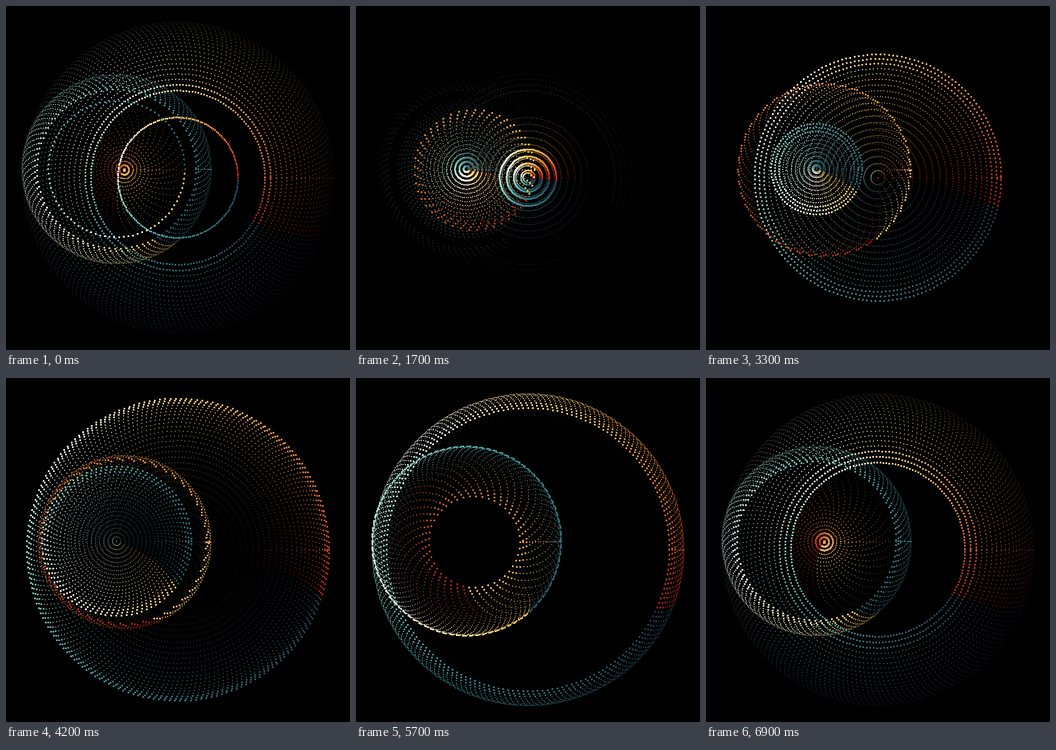
Write an HTML page with a canvas that moves like this. It is 600x600 px and loops after 7 s.

```html
<!DOCTYPE html>
<html>
<head>
<meta charset="utf-8">
<style>
  html, body { margin: 0; height: 100%; background: #000; overflow: hidden; }
  canvas { display: block; }
</style>
</head>
<body>
<canvas id="stage" width="600" height="600"></canvas>
<script>
const ctx = document.getElementById('stage').getContext('2d');
const STEP_MS = 100, STEPS = 70;
const SWELL = 69;        // steps from zero radius back to zero
const CYCLE = 73.3;      // phase carried over when the loop restarts
const TURN = 16;         // dot spacings rotated per loop
const TRAIL = 25;

// 1 x 256 colour ramp shared by all rings
const ramp = ctx.createLinearGradient(0, 0, 256, 0);
['#233d55', '#2f6670', '#3f9096', '#8ed2c4', '#ffffff', '#ffd272', '#e88430', '#b21a10']
  .forEach((color, i, all) => ramp.addColorStop(i / (all.length - 1), color));
ctx.fillStyle = ramp;
ctx.fillRect(0, 0, 256, 1);
const pixels = ctx.getImageData(0, 0, 256, 1).data;

function rampColor(p) {
  const i = Math.round(p * 255) * 4;
  return `rgb(${pixels[i]},${pixels[i + 1]},${pixels[i + 2]})`;
}

// start: step at which the ring begins to grow; from, to: its part of the ramp
const rings = [
  { x: 300, y: 299.5, max: 272, count: 180, start: 13, from: 0, to: 1 },
  { x: 206.5, y: 286, max: 151, count: 45, start: 0.2, from: 1, to: 0.72 },
  { x: 193, y: 284.5, max: 165, count: 90, start: 22, from: 0.74, to: 0.1 }
];
for (const ring of rings)
  ring.colors = Array.from({ length: ring.count }, (_, i) =>
    rampColor(ring.from + (ring.to - ring.from) * i / (ring.count - 1)));

function radiusAt(ring, step) {
  const local = step - ring.start + (step < ring.start ? CYCLE : 0);
  return ring.max * Math.max(0, Math.sin(Math.PI * local / SWELL));
}

function dot(x, y, size, color) {
  ctx.fillStyle = color;
  ctx.fillRect(Math.round(x - size / 2), Math.round(y - size / 2), size, size);
}

function drawRing(ring, step, size) {
  const { x, y, count, colors } = ring;
  const r = radiusAt(ring, step);
  const shift = TURN * step / STEPS;
  for (let i = 0; i < count; i++) {
    const a = (i + shift) / count * 2 * Math.PI;
    dot(x + r * Math.cos(a), y + r * Math.sin(a), size, colors[i]);
  }
  // one dot stays on the horizontal axis
  dot(x + r, y, size, colors[Math.floor(count - 1 - shift)]);
}

function draw(step) {
  ctx.globalAlpha = 1;
  ctx.fillStyle = '#000';
  ctx.fillRect(0, 0, 600, 600);
  for (let age = TRAIL - 1; age >= 0; age--) {
    ctx.globalAlpha = (1 - age / TRAIL) ** 1.5;
    for (const ring of rings) drawRing(ring, (step - age + STEPS) % STEPS, age < 3 ? 3 : 2);
  }
}

let shown = -1;
const begin = performance.now();
function tick() {
  const step = Math.floor((performance.now() - begin) / STEP_MS) % STEPS;
  if (step !== shown) draw(shown = step);
  requestAnimationFrame(tick);
}
tick();
</script>
</body>
</html>
```
